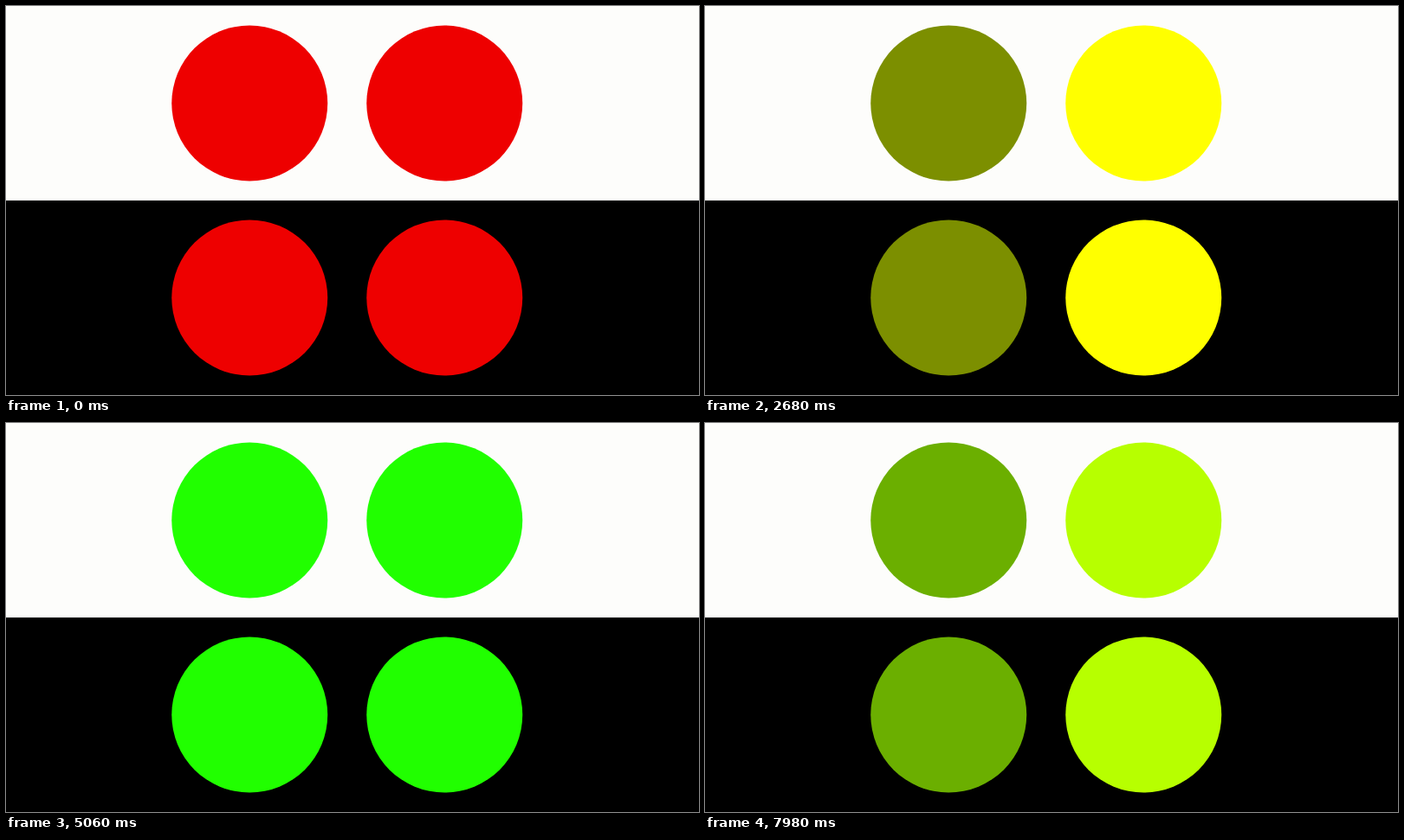
Recreate the animation shown at these times as an HTML page without scripts. Size 800 by 450 pixels, loop 8000 ms.

```html
<!DOCTYPE html>
<html lang="en">
<head>
<meta charset="utf-8">
<title>Red to green: two ways to blend</title>
<style>
  html, body { margin: 0; width: 100%; height: 100%; overflow: hidden; background: #000; }
  svg { display: block; width: 800px; height: 450px; }
  .mix { animation: mix 8s linear infinite; }
  .hue { animation: hue 8s linear infinite; }

  /* Straight channel blend, eased in and out, with a pause on green */
  @keyframes mix {
    0% { fill: rgb(238 0 0); }
    7.5% { fill: rgb(230 8 0); }
    15.5% { fill: rgb(205 25 0); }
    24.5% { fill: rgb(172 82 0); }
    33.5% { fill: rgb(124 143 0); }
    40.75% { fill: rgb(94 190 0); }
    47.5% { fill: rgb(68 234 0); }
    56% { fill: rgb(40 252 0); }
    63.25%, 80.5% { fill: rgb(33 255 0); }
    87.25% { fill: rgb(36 255 0); }
    93.25% { fill: rgb(70 222 0); }
    99.75%, 100% { fill: rgb(107 175 0); }
  }

  /* Same timing, travelling round the hue wheel */
  @keyframes hue {
    0% { fill: rgb(238 0 0); }
    7.5% { fill: rgb(244 19 0); }
    15.5% { fill: rgb(250 65 0); }
    24.5% { fill: rgb(254 152 0); }
    33.5% { fill: rgb(255 255 0); }
    40.75% { fill: rgb(180 255 0); }
    47.5% { fill: rgb(117 255 0); }
    56% { fill: rgb(59 255 0); }
    63.25%, 74.1% { fill: rgb(33 255 0); }
    80.5% { fill: rgb(44 255 0); }
    87.25% { fill: rgb(77 255 0); }
    93.25% { fill: rgb(125 255 0); }
    99.75%, 100% { fill: rgb(183 255 0); }
  }
</style>
</head>
<body>
<svg viewBox="0 0 800 450">
  <rect width="800" height="225" fill="#fdfdfb"/>
  <rect y="225" width="800" height="225"/>
  <g class="mix">
    <circle cx="281.25" cy="112.5" r="90"/>
    <circle cx="281.25" cy="337.5" r="90"/>
  </g>
  <g class="hue">
    <circle cx="506.25" cy="112.5" r="90"/>
    <circle cx="506.25" cy="337.5" r="90"/>
  </g>
</svg>
</body>
</html>
```
